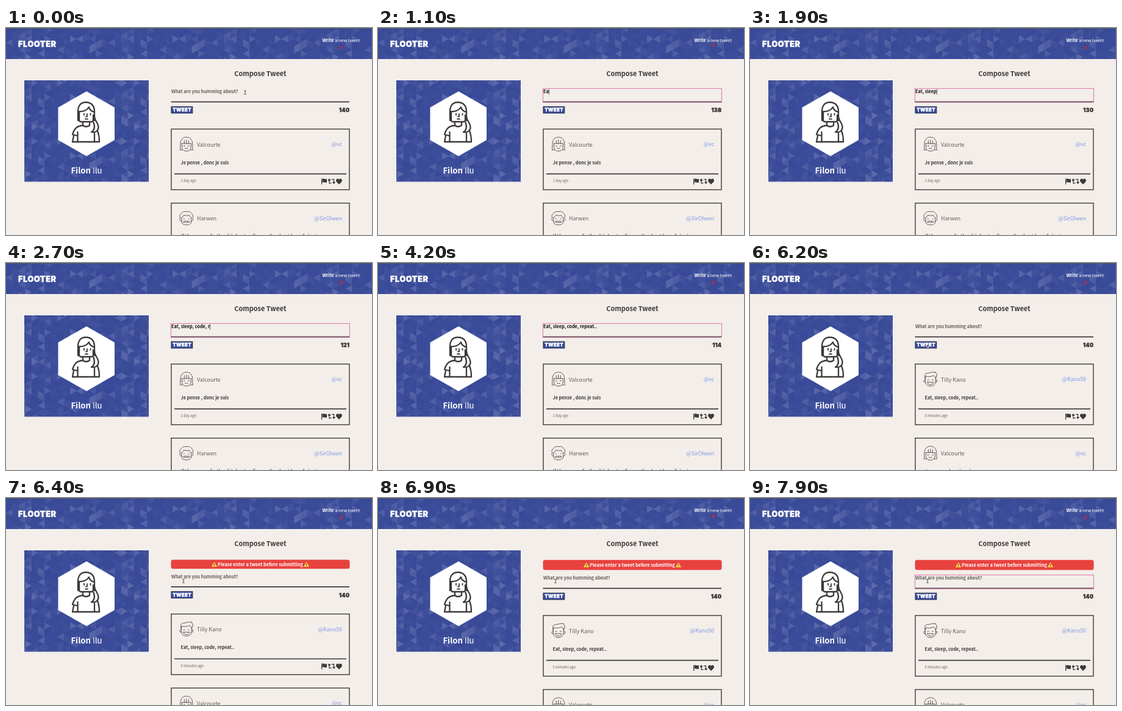
Write an HTML page that moves like this. It is 600x340 px and loops after 8 s.

```html
<!DOCTYPE html>
<html lang="en">
<head>
<meta charset="utf-8">
<title>Compose</title>
<style>
html, body { margin: 0; width: 100%; height: 100%; overflow: hidden; background: #f3eeea; }
svg { display: block; width: 600px; height: 340px; }
text { font-family: "Noto Sans CJK JP", "Noto Sans CJK SC", "Noto Sans CJK", "Noto Sans", sans-serif; fill: #3d3937; white-space: pre; }
.b { font-weight: 700; }
.l { font-weight: 300; }
.w { fill: #fff; }
.mid { text-anchor: middle; }
.end { text-anchor: end; }
.fat { font-family: Inter, Roboto, sans-serif; font-weight: 900; stroke-width: .4; }
.ink { fill: none; stroke: #3d3937; stroke-linecap: round; stroke-linejoin: round; }
.face { stroke: #55504d; stroke-width: .95; }
</style>
</head>
<body>
<svg viewBox="0 0 600 340" xmlns="http://www.w3.org/2000/svg">
  <defs>
    <pattern id="tris" width="168" height="96" patternUnits="userSpaceOnUse">
      <rect width="168" height="96" fill="#3a4b99"/>
      <g id="tiles"></g>
    </pattern>
    <clipPath id="noticeClip"><rect id="clipBox" x="270" width="294"/></clipPath>

    <g id="girl" class="ink face">
      <path d="M-6.500 9.500H-10.500C-9.500 6 -10.500 0 -9.500 -4C-8 -9.500 -4 -11.500 0 -11.500C4 -11.500 8 -9.500 9.500 -4C10.500 0 9.500 6 10.500 9.500H6.500"/>
      <path d="M-7.500 -1V4C-7.500 9 -4 11.500 0 11.500C4 11.500 7.500 9 7.500 4V-1"/>
      <path d="M-7.500 -1H7.500M-3.500 -1V-6M0 -1V-7M3.500 -1V-6"/>
      <path d="M-5 3q1.300 -1.500 2.600 0M2.400 3q1.300 -1.500 2.600 0M-2.500 6.500q2.500 2.300 5 0"/>
    </g>
    <g id="boy" class="ink face">
      <path d="M-8.500 -3V3C-8.500 9 -4 11.500 0 11.500C4 11.500 8.500 9 8.500 3V-3"/>
      <path d="M-8.500 -1C-11 -7 -8 -10 -4 -10C0 -10.500 3 -12 9 -11.500C8 -10.500 8 -10 10 -9C11 -6 10 -3 8.500 -1C8 -4 7 -5 5 -6C0 -3.500 -4 -4 -7 -5Z"/>
      <path d="M-8.500 1q-2.500 -.5 -2.500 2t2.800 2.200M8.500 1q2.500 -.5 2.500 2t-2.800 2.200"/>
      <path d="M-5 1.500q1.300 -1.800 2.600 0M2.400 1.500q1.300 -1.800 2.600 0M-5 5H5C4.500 8 2.500 9 0 9C-2.500 9 -4.500 8 -5 5Z"/>
    </g>
    <g id="sage" class="ink face">
      <path d="M-8 5C-12 4 -11 1 -10 -1C-12 -4 -10 -7 -8 -8C-6 -11 -2 -11.500 0 -10.500C3 -11.500 7 -11 8 -8C10 -7 12 -4 10 -1C11 1 12 4 8 5"/>
      <path d="M-8 -1V5C-8 9 -5 11 0 11C5 11 8 9 8 5V-1"/>
      <path d="M-8 -1C-6 -2 -5 -3 -4.500 -5C0 -4 3 -4 4.500 -5C5 -3 6 -2 8 -1"/>
      <path d="M-4 .5v1M4 .5v1M-5.500 6q2.500 -2 5.500 -1q3 -1 5.500 1q-2.500 1.800 -5.500 .8q-3 1 -5.500 -.8"/>
    </g>
    <g id="actions" fill="#3d3937">
      <path d="M517 247.200h1.300v9.800h-1.300zM518.700 248c2.500 -1.400 3.500 1.200 7.300 -.2v5.600c-3.500 1.500 -5 -1 -7.300 .2z"/>
      <path d="M528 250.500l2 -2.300l2 2.300M530 248.800v6h3.500M539.500 253l-2 2.300l-2 -2.300M537.500 254.700v-6h-3.500" fill="none" stroke="#3d3937" stroke-width="1.300"/>
      <path d="M546 257l-4.300 -4.400c-2.400 -3 1.700 -7.200 4.300 -3.700c2.600 -3.500 6.700 .7 4.300 3.700z"/>
    </g>
  </defs>

  <rect width="600" height="340" fill="#f3eeea"/>
  <rect width="600" height="51" fill="url(#tris)"/>
  <rect width="600" height="1.300" fill="#4d5a68"/>
  <text class="fat w" x="20" y="30.700" font-size="12.700" letter-spacing=".6" stroke="#fff">FLOOTER</text>
  <text class="w end" x="580" y="23.300" font-size="7.250"><tspan class="b">Write</tspan> a new tweet</text>
  <path id="chevron" d="M546.800 29.300l2.700 2.500l2.700 -2.500M546.800 32.300l2.700 2.500l2.700 -2.500" fill="none" stroke="#b93344" stroke-width="1.200"/>

  <rect x="30" y="86" width="204" height="166.500" fill="url(#tris)"/>
  <path d="M132 104L178 130.500V184L132 210.500L85.500 184V130.500Z" fill="#fff"/>
  <g class="ink" stroke-width="2.300">
    <path d="M118 152V137C118 127 123 122 131 122C140 122 145 128 145 137V152"/>
    <path d="M118 137.500C127 137.500 133 135 136 130C137 134 140 137 145 138"/>
    <path d="M120 138V151q0 3 3 3h17q3 0 3 -3V143"/>
    <path d="M128 140.500v2.500M138.500 140.500v2.500M133 141v4.500h-2M130 149.500h4" stroke-width="1.800"/>
    <path d="M145 145C145 152 151.500 156 151.500 163C151.500 169 147 172 140 171C145 168 146 162 143.500 155"/>
    <path d="M126 155v5C116 161 112 165 109 175L117 177M126 160q5 4 11 0v-5"/>
    <path d="M117.500 171V187H145V173M111 177L109 187H117M150 169C152 174 153 180 153 187H145"/>
  </g>
  <text class="w mid" x="132" y="238.500" font-size="13.200"><tspan class="b">Filon</tspan><tspan class="l"> Ilu</tspan></text>

  <text class="b mid" x="417" y="79" font-size="10.900">Compose Tweet</text>
  <g id="notice" clip-path="url(#noticeClip)">
    <rect id="noticeBox" x="270.500" width="293" rx="4" fill="#e8423f"/>
    <g id="noticeText">
      <text class="b w mid" x="417" y="2.700" font-size="7.350">Please enter a tweet before submitting</text>
      <g id="sign">
        <path d="M341.500 -3.600l4 7h-8z" fill="#f8cf4a" stroke="#f8cf4a" stroke-width="1" stroke-linejoin="round"/>
        <path d="M341.500 -1.500v2.700M341.500 2.200v.8" stroke="#3d3020" stroke-width=".9"/>
      </g>
      <use href="#sign" x="151"/>
    </g>
  </g>

  <g id="page">
    <text id="hint" class="b" x="271" y="107.400" font-size="7.300" style="fill:#625d5a">What are you humming about?</text>
    <text id="typed" class="b" x="271" y="107.400" font-size="7.300" style="fill:#111"></text>
    <rect id="caret" y="100.500" width=".8" height="9" fill="#222"/>
    <path d="M270.500 121.300H563" stroke="#3d3937" stroke-width="1.700"/>
    <rect id="ring" x="270.300" y="99.300" width="293" height="22.600" fill="none" stroke="#d4589a" stroke-width=".8"/>
    <rect x="270.900" y="129" width="35" height="11" fill="#384a9b" stroke="#22262f" stroke-width=".8"/>
    <text class="fat w mid" x="288.600" y="137.400" font-size="7.900" letter-spacing=".3" stroke="#fff">TWEET</text>
    <text id="count" class="fat end" x="563.200" y="138" font-size="8.900" letter-spacing=".2" stroke="#3d3937"></text>
    <g id="cards"></g>
  </g>

  <g id="beam" class="ink" stroke-width=".9"><path d="M-1.400 -3q1.400 0 1.400 .8V2.200q0 .8 -1.400 .8M1.400 -3q-1.400 0 -1.400 .8M0 2.200q0 .8 1.400 .8"/></g>
  <path id="hand" d="M-.6 -1.500q.6 -.6 1 .1v1.700l2 .5q.7 .3 .5 1l-.5 2h-2.600l-1.700 -2q.1 -.9 1.300 -.2z" fill="#ccd" stroke="#222" stroke-width=".7"/>
  <path id="arrow" d="M0 0v7l1.700 -1.600l1.200 2.600l1.100 -.5l-1.200 -2.500h2.200z" fill="#222" stroke="#fff" stroke-width=".5"/>
</svg>
<script>
const LOOP = 8000, PITCH = 121.6;
const FOCUS = 500, TYPE = 900, KEY = 94, POST = 5000, ALERT = 6240, REFOCUS = 7200;
const MESSAGE = "Eat, sleep, code, repeat..";
const TYPED = TYPE + MESSAGE.length * KEY;

const $ = id => document.getElementById(id);
const set = (id, attrs) => { for (const k in attrs) $(id).setAttribute(k, attrs[k]); };
const show = (id, on) => set(id, { visibility: on ? "visible" : "hidden" });
const clamp = v => Math.max(0, Math.min(1, v));
const swing = p => .5 - Math.cos(clamp(p) * Math.PI) / 2;

// Columns of triangles that point left and right.
function buildTiles() {
  const cols = 16, rows = 16, w = 10.5, s = 6;
  let seed = 11, out = "";
  const rnd = () => (seed = seed * 16807 % 2147483647) / 2147483647;
  for (let i = 0; i < cols; i++) {
    const tones = Array.from({ length: rows }, () => {
      const r = rnd();
      return r > .86 ? .07 + rnd() * .1 : r * .1 - .045;
    });
    for (let j = 0; j <= rows; j++) {
      const tone = tones[j % rows], right = (i + j) % 2;
      const base = (i + 1 - right) * w, tip = (i + right) * w;
      out += `<path d="M${base} ${(j - 1) * s}v${2 * s}L${tip} ${j * s}z" fill="${tone > 0 ? "#fff" : "#102070"}" opacity="${Math.abs(tone).toFixed(3)}"/>`;
    }
  }
  $("tiles").innerHTML = out;
}

function card(id, face, name, handle, words, age) {
  return `<g id="${id}">
    <rect x="270.900" y="166" width="292" height="99.600" fill="none" stroke="#3d3937" stroke-width="1.400"/>
    <use href="#${face}" x="295.800" y="190.800"/>
    <text class="l" x="313" y="194.500" font-size="8.800" style="fill:#625d5a">${name}</text>
    <text class="l end" x="551" y="194" font-size="8.800" style="fill:#7f98e0">${handle}</text>
    <text class="b" x="286.500" y="223.500" font-size="7.300">${words}</text>
    <path d="M276 239.700H558" stroke="#3d3937" stroke-width="1.700"/>
    <text x="286.500" y="253" font-size="5.750" style="fill:#66615e">${age}</text>
    <use href="#actions"/>
  </g>`;
}

// Rests low, then one high and one half-high hop every two seconds.
function hop(t) {
  const p = ((t - 300 + LOOP) % 2000) / 2000;
  const arc = (from, peak, to) => p < peak ? swing((p - from) / (peak - from)) : swing((to - p) / (to - peak));
  return p < .5 ? arc(.2, .4, .5) : .5 * arc(.5, .6, .8);
}

function drawPointer(t, shift) {
  const k = swing((t - 4300) / 550);
  const x = 392 - 101 * k, y = 106 + 30.5 * k;
  const on = t < TYPE || t >= 4300;
  const overBox = y > 99 + shift && y < 122 + shift;
  const overButton = x < 306 && y > 129 + shift && y < 140.5 + shift;
  const kind = overBox ? "beam" : overButton ? "hand" : "arrow";
  for (const id of ["beam", "hand", "arrow"]) {
    show(id, on && id === kind);
    set(id, { transform: `translate(${x} ${y})` });
  }
}

function draw(t) {
  const posted = t >= POST;
  const n = posted ? 0 : Math.max(0, Math.min(MESSAGE.length, Math.floor((t - TYPE) / KEY)));
  const focused = (t >= FOCUS && !posted) || t >= REFOCUS;

  $("typed").textContent = MESSAGE.slice(0, n);
  $("count").textContent = 140 - n;
  show("hint", n === 0);
  show("ring", focused);

  const typing = t >= TYPE && t < TYPED;
  const since = t - (posted ? REFOCUS : t < TYPE ? FOCUS : TYPED);
  show("caret", focused && (typing || since % 1000 < 500));
  set("caret", { x: 271 + (n ? $("typed").getComputedTextLength() : 0) });

  const p = swing((t - ALERT) / 200), shift = 27 * p;
  const top = 97 + 4.6 * p, tall = 16.9 * p;
  show("notice", p > 0);
  set("noticeBox", { y: top, height: tall });
  set("clipBox", { y: top, height: tall });
  set("noticeText", { transform: `translate(0 ${top + 3 * p + 5.3})` });
  set("page", { transform: `translate(0 ${shift})` });

  show("fresh", posted);
  set("older", { transform: `translate(0 ${posted ? PITCH : 0})` });
  set("oldest", { transform: `translate(0 ${posted ? 2 * PITCH : PITCH})` });
  set("chevron", { transform: `translate(0 ${-4 * hop(t)})` });
  drawPointer(t, shift);
}

buildTiles();
$("cards").innerHTML =
  card("fresh", "boy", "Tilly Kano", "@Kano50", MESSAGE, "5 minutes ago") +
  card("older", "girl", "Valcourte", "@vc", "Je pense , donc je suis", "1 day ago") +
  card("oldest", "sage", "Harwen", "@SirOlwen", "If I have seen further it is by standing on the shoulders of giants", "1 day ago");

function tick() {
  draw(performance.now() % LOOP);
  requestAnimationFrame(tick);
}
tick();
</script>
</body>
</html>
```
